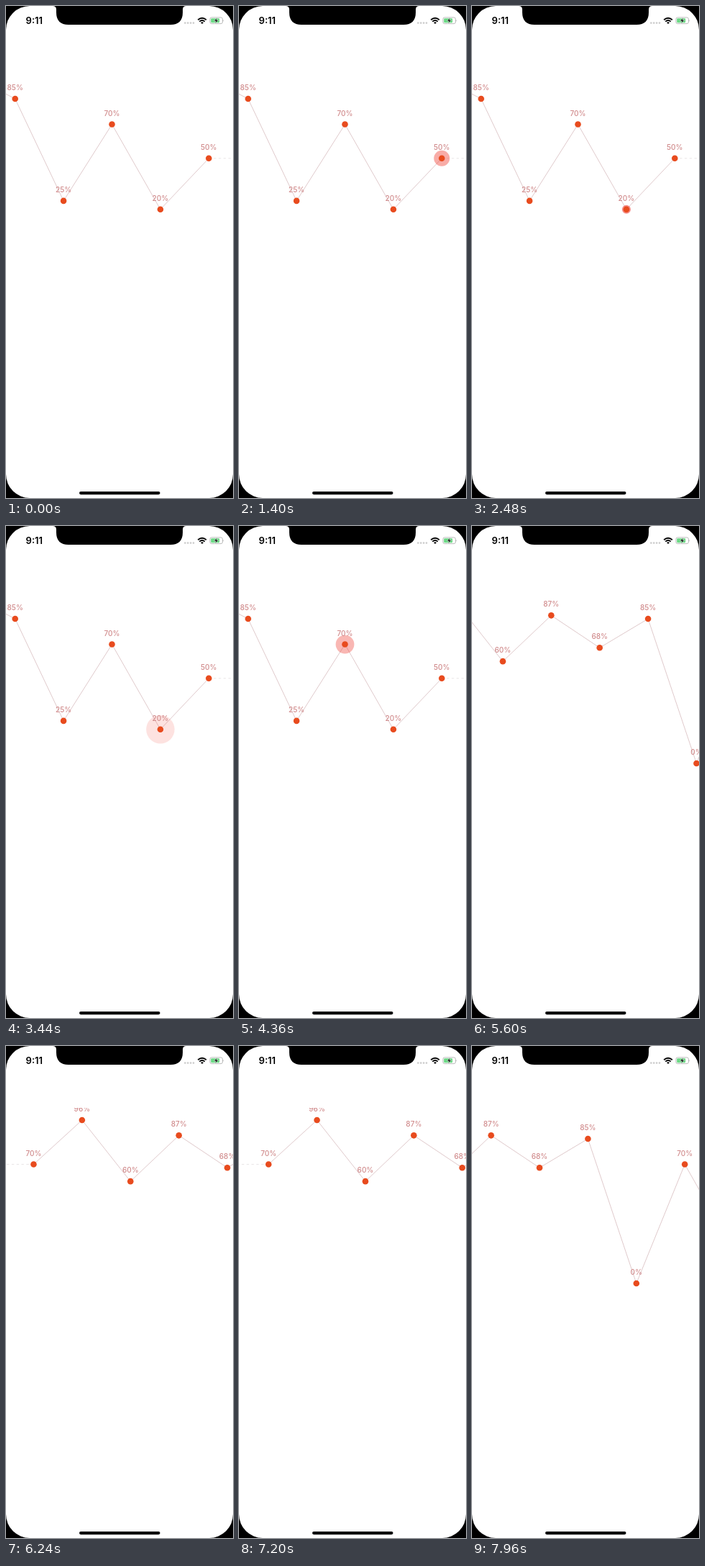
An HTML page for the animation above (8000 ms loop, 316 by 684 pixels).

```html
<!DOCTYPE html>
<html lang="en">
<head>
<meta charset="utf-8">
<title>Scrolling line chart</title>
<style>
html, body { margin: 0; width: 100%; height: 100%; overflow: hidden; background: #000; }
svg { display: block; width: 100vw; height: 100vh; font-family: Inter, Roboto, sans-serif; }
.label { font-size: 10px; font-weight: 500; fill: #d08a8b; text-anchor: middle; }
.time { font-size: 13px; font-weight: 600; text-anchor: middle; }
</style>
</head>
<body>
<svg viewBox="0 0 316 684">
  <defs><clipPath id="view"><rect y="86" width="316" height="250"/></clipPath></defs>
  <rect width="316" height="684" rx="33" fill="#fff"/>
  <g clip-path="url(#view)"><g id="chart"></g></g>

  <path d="M65 0Q70 0 70 5V9Q70 26 87 26H229Q246 26 246 9V5Q246 0 251 0Z"/>
  <text class="time" x="39.3" y="25">9:11</text>
  <g fill="#ccc">
    <circle cx="249.3" cy="23.6" r="1.3"/><circle cx="253.2" cy="23.6" r="1.3"/>
    <circle cx="257.1" cy="23.6" r="1.3"/><circle cx="261" cy="23.6" r="1.3"/>
  </g>
  <g fill="none" stroke="#000" stroke-width="1.9">
    <path d="M267.2 19.3Q273 14.2 278.8 19.3M269.3 21.6Q273 18.4 276.7 21.6"/>
    <path d="M271 22.9Q273 21.6 275 22.9L273 25Z" fill="#000" stroke="none"/>
  </g>
  <rect x="283.9" y="15.9" width="17.6" height="8.7" rx="2.4" fill="#fff" stroke="#aaa" stroke-width=".8"/>
  <rect x="285.2" y="17.2" width="12" height="6.1" rx="1.2" fill="#6bd985"/>
  <path d="M302.5 18.8Q304 20.2 302.5 21.7Z" fill="#aaa"/>
  <path d="M294.2 16L289.6 20.9H292.2L291 24.6L295.7 19.6H293Z" stroke="#fff" stroke-width=".5"/>
  <rect x="102" y="675" width="112.5" height="4.2" rx="2.1"/>
</svg>
<script>
const LOOP = 8000, STEP = 67.4, RIPPLE = 1400;
const values = [70, 96, 60, 87, 68, 85, 0, 70, 20, 100, 85, 25, 70, 20, 50];
const points = values.map((v, i) => ({ v, x: (i + .5) * STEP, y: 330 - 2.364 * v }));

// [time, scroll offset]: fling to the start, bounce, pull, bounce, fling back
const END = values.length * STEP - 316;
const keys = [
  [0, END], [4440, END], [4600, 655], [4800, 545], [5080, 385], [5350, 235], [5600, 126],
  [5800, 55], [5960, 5], [6060, -12], [6140, -10], [6240, -4.8], [6360, -1.3], [6520, 0],
  [6720, 0], [6820, -12], [6940, -28], [7040, -20], [7200, -7.5], [7360, -1.8], [7520, 0],
  [7660, 0], [7760, 40], [7860, 118], [7960, 208.4], [LOOP, 244]
];
// [start time, point index]
const ripples = [[930, 14], [2360, 13], [3760, 12]];

const first = points[0], last = points[points.length - 1];
const dashed = (p, dx) =>
  `<path d="M${p.x} ${p.y}h${dx}" stroke="#e9e5e6" stroke-dasharray="3.4 3.4"/>`;
const chart = document.getElementById('chart');
chart.innerHTML =
  dashed(first, -100) + dashed(last, 100) +
  `<polyline points="${points.map(p => p.x + ',' + p.y).join(' ')}" fill="none" stroke="#dcc3c6" stroke-width=".9"/>` +
  '<circle id="ripple" fill="#f0463c"/>' +
  points.map(p => `<circle cx="${p.x}" cy="${p.y}" r="4.3" fill="#e84b1e"/>
    <text class="label" x="${p.x}" y="${p.y - 12}">${p.v}%</text>`).join('');
const ripple = document.getElementById('ripple');

const slope = i => (keys[i + 1][1] - keys[i][1]) / (keys[i + 1][0] - keys[i][0]);

// Monotone tangent, so holds and turning points stay flat
function tangent(i) {
  if (i === 0) return 0;
  if (i === keys.length - 1) return slope(i - 1);
  const a = slope(i - 1), b = slope(i);
  return a * b > 0 ? 2 * a * b / (a + b) : 0;
}

function scrollAt(t) {
  const i = keys.findIndex(k => k[0] > t) - 1;
  const [t0, a] = keys[i], [t1, b] = keys[i + 1];
  const d = t1 - t0, u = (t - t0) / d, w = 1 - u;
  return a * w * w * (1 + 2 * u) + b * u * u * (3 - 2 * u)
    + d * u * w * (w * tangent(i) - u * tangent(i + 1));
}

function draw(now) {
  const t = Math.max(0, now) % LOOP;
  chart.setAttribute('transform', `translate(${-scrollAt(t)} 0)`);
  const hit = ripples.find(([start]) => t >= start && t < start + RIPPLE);
  ripple.setAttribute('opacity', 0);
  if (hit) {
    const p = (t - hit[0]) / RIPPLE, { x, y } = points[hit[1]];
    ripple.setAttribute('cx', x);
    ripple.setAttribute('cy', y);
    ripple.setAttribute('r', 4.3 + 20 * p);
    ripple.setAttribute('opacity', .68 * (1 - p));
  }
}

const begin = performance.now();
function tick(now) {
  draw(now - begin);
  requestAnimationFrame(tick);
}
draw(0);
requestAnimationFrame(tick);
</script>
</body>
</html>
```
